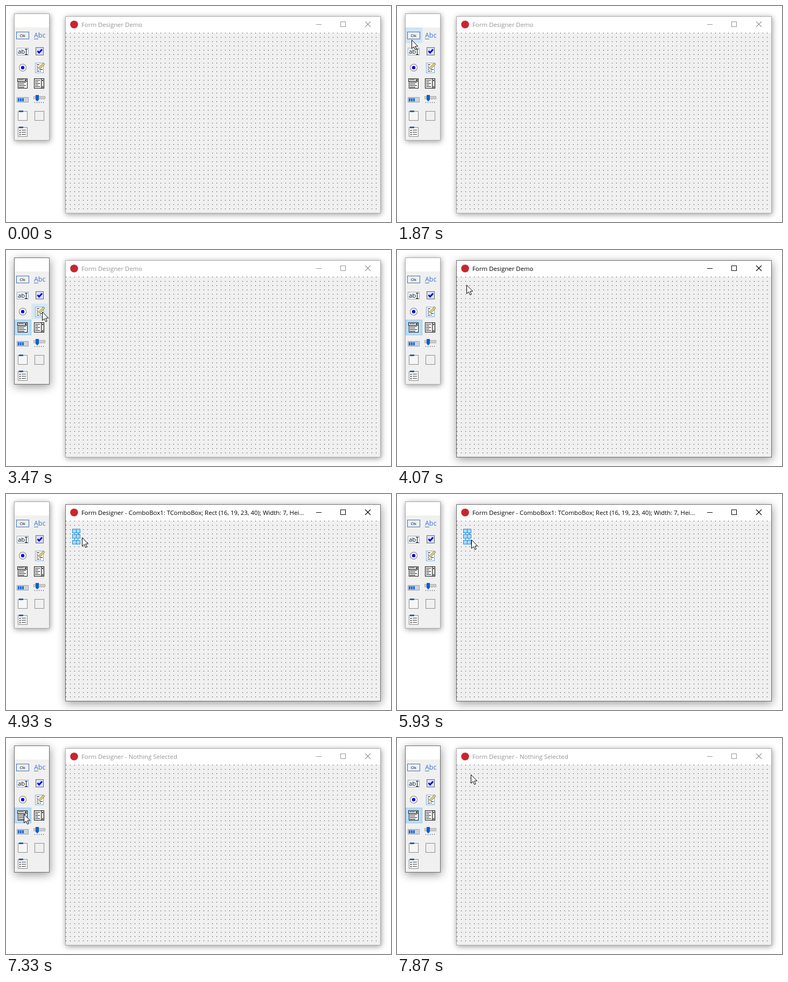
An HTML page with a canvas that plays this animation: 715 by 403 pixels, repeating every 8 s.

```html
<!DOCTYPE html>
<html lang="en">
<head>
<meta charset="utf-8">
<title>Form Designer Demo</title>
<style>
  html, body { margin: 0; width: 100%; height: 100%; overflow: hidden; background: #fff; }
  canvas { display: block; }
</style>
</head>
<body>
<canvas id="stage" width="715" height="403"></canvas>
<script>
const c = document.getElementById('stage').getContext('2d');
const TICKS = 120, RATE = 0.015; // 15 ticks per second
const BLUE = '#3b6fc4', PALE = '#f6f6f6', GREY = '#8c8c8c';

// Each glide starts where the mouse last rested
const glides = [
  { from: 1, to: 6, x: -72, y: 16 },
  { from: 7, to: 15, x: 26, y: 60 },
  { from: 27, to: 42, x: 48, y: 107 },
  { from: 42, to: 48, x: 36, y: 140 },
  { from: 49, to: 58, x: 129, y: 65 },
  { from: 61, to: 74, x: 141, y: 81 },
  { from: 76, to: 82, x: 138, y: 85 },
  { from: 92, to: 99, x: 24, y: 83 },
  { from: 99, to: 108, x: 33, y: 142 },
  { from: 111, to: 118, x: 137, y: 68 }
];

function mouseAt(tick) {
  let x = 842, y = 467;
  for (const g of glides) {
    const f = Math.min(1, Math.max(0, (tick - g.from) / (g.to - g.from)));
    x += (g.x - x) * f;
    y += (g.y - y) * f;
  }
  return [Math.round(x), Math.round(y)];
}

function fill(color, x, y, w, h) {
  c.fillStyle = color;
  c.fillRect(x, y, w, h);
}

function box(x, y, w, h, color, border) {
  fill(border, x, y, w, h);
  fill(color, x + 1, y + 1, w - 2, h - 2);
}

function text(s, x, y, size, color) {
  c.font = `${size}px "Open Sans", "Noto Sans", sans-serif`;
  c.fillStyle = color;
  c.fillText(s, x, y);
}

function trace(points) {
  c.beginPath();
  points.forEach(([x, y]) => c.lineTo(x, y));
}

function line(points, color, width = 1) {
  trace(points);
  c.strokeStyle = color;
  c.lineWidth = width;
  c.stroke();
}

function shape(points, color) {
  trace(points);
  c.fillStyle = color;
  c.fill();
}

function disc(x, y, r, color) {
  c.beginPath();
  c.arc(x, y, r, 0, 7);
  c.fillStyle = color;
  c.fill();
}

// Ragged rows that stand for lines of writing
function writing(x, y, rows, width) {
  for (let i = 0; i < rows; i++) fill('#111', x, y + i * 3, width - i % 2 * 3, 1);
}

function windowFrame(x, y, w, h, titleHeight, active) {
  c.save();
  c.shadowColor = 'rgba(0,0,0,.4)';
  c.shadowBlur = active ? 16 : 10;
  c.shadowOffsetX = 1;
  c.shadowOffsetY = active ? 4 : 2;
  fill('#fff', x, y, w, h);
  c.restore();
  box(x, y, w, h, '#f0f0f0', active ? '#6b6b6b' : '#aaa');
  fill('#fff', x + 1, y + 1, w - 2, titleHeight);
}

const icons = {
  button() {
    box(19, 48, 24, 14, '#f0f0f0', BLUE);
    text('Ok', 25.5, 58, 8, '#111');
  },
  label() {
    text('Abc', 52, 59, 12.4, BLUE);
    fill(BLUE, 52, 61, 8, 1);
  },
  edit() {
    box(20, 78, 22, 14, '#fff', '#8eaed0');
    text('ab', 22, 89, 11.3, '#000');
    fill('#000', 37, 81, 1, 9);
    fill('#000', 35, 80, 5, 1);
    fill('#000', 35, 90, 5, 1);
  },
  checkBox() {
    box(55, 77, 15, 15, '#dde1f5', '#666');
    line([[58.5, 84], [61.5, 87], [67, 81]], '#00f', 3);
  },
  radio() {
    disc(31, 115, 7, '#777');
    disc(31, 115, 6, '#fff');
    disc(31, 115, 3.2, '#00f');
  },
  memo() {
    box(54, 106, 16, 19, '#fff', '#7ba3cf');
    writing(57, 109, 5, 5);
    writing(63, 112, 4, 5);
    line([[61, 117], [71, 107]], '#8a7d4a', 4);
    line([[61.5, 116.5], [70.5, 107.5]], '#f0df82', 2.3);
  },
  comboBox() {
    box(21, 135, 19, 6, '#fff', '#111');
    fill('#111', 23, 137, 10, 1);
    shape([[34, 137], [39, 137], [36.5, 140]], '#111');
    box(22, 140, 18, 14, '#fff', '#111');
    writing(24, 142, 4, 13);
  },
  listBox() {
    box(52, 135, 19, 19, '#fff', '#111');
    writing(54, 138, 5, 9);
    box(65, 135, 6, 19, '#ddd', '#111');
    for (const y of [138, 150]) fill('#111', 67, y, 2, 2);
  },
  progress() {
    box(20, 170, 22, 10, '#c9d3df', '#94a3b5');
    for (let x = 22; x < 34; x += 4) fill('#2467c9', x, 172, 3, 6);
  },
  trackBar() {
    box(51, 168, 22, 6, '#ccc', '#b0b0b0');
    shape([[55, 166], [61, 166], [61, 175], [58, 178], [55, 175]], '#0a5fd0');
    for (let x = 53; x < 73; x += 4) fill('#666', x, 179, 1, 2);
  },
  groups() {
    box(53, 196, 18, 18, '#f0f0f0', GREY);
    for (const y of [196, 226]) {
      box(22, y, 18, 18, PALE, GREY);
      fill('#2f5f9e', 24, y - 1, 8, 3);
    }
    for (let y = 231; y < 242; y += 4) {
      fill('#444', 25, y, 2, 2);
      fill('#444', 29, y, 8, 1);
    }
  }
};

function hitCell([x, y]) {
  const col = Math.floor((x - 16) / 31), row = Math.floor((y - 40) / 30);
  const inside = col >= 0 && col < 2 && row >= 0 && row < 7 && col + row < 7;
  return inside ? [col, row] : null;
}

function cell(col, row, color, border) {
  box(16 + col * 31, 40 + row * 30, 31, 29, color, border);
}

function palette(tick, active, comboDown) {
  windowFrame(15, 14, 66, 237, 25, active);
  // Hover fades over four ticks
  c.globalAlpha = .25;
  for (let back = 0; back < 4; back++) {
    const hit = hitCell(mouseAt(tick - back));
    if (hit) cell(...hit, '#d5e6f5', '#bcd9f2');
  }
  c.globalAlpha = 1;
  if (comboDown) cell(0, 3, '#b9dcf5', '#93c9f2');
  Object.values(icons).forEach(draw => draw());
}

function form(title, active) {
  const ink = active ? '#000' : '#949494';
  windowFrame(110, 19, 586, 368, 30, active);
  disc(126.5, 34.5, 7.3, '#c9252f');
  text(title, 140, 39, 11.38, ink);
  fill(ink, 576, 34, 10, 1);
  box(621, 29, 10, 10, '#fff', ink);
  for (const d of [-5, 5]) line([[672 - d, 29], [672 + d, 39]], ink, 1.1);
  for (let y = 50; y < 386; y += 8)
    for (let x = 111; x < 695; x += 8) fill('#000', x, y, 1, 1);
}

function selectedCombo() {
  box(127, 69, 7, 21, '#fff', '#0078d7');
  for (const y of [65, 75, 86])
    for (const x of [123, 130]) box(x, y, 8, 8, '#a9dafc', '#1f86d2');
}

function pointer(x, y) {
  c.save();
  c.translate(x + .5, y + .5);
  trace([[0, 0], [0, 16], [3.7, 12.6], [6.2, 18.3], [8.7, 17.2], [6.2, 11.7], [11.2, 11.5]]);
  c.closePath();
  c.fillStyle = '#fff';
  c.fill();
  c.strokeStyle = '#000';
  c.lineWidth = 1;
  c.stroke();
  c.restore();
}

function draw(now) {
  const tick = Math.floor((now + 5) * RATE) % TICKS;
  const within = (from, to) => tick >= from && tick < to;
  const selected = within(69, 92);
  const title = selected
    ? 'Form Designer - ComboBox1: TComboBox; Rect (16, 19, 23, 40); Width: 7, Hei...'
    : tick < 69 ? 'Form Designer Demo' : 'Form Designer - Nothing Selected';

  fill('#fff', 0, 0, 715, 403);
  palette(tick, within(49, 61) || tick >= 109, within(49, 69) || tick >= 109);
  form(title, within(61, 109));
  if (selected) selectedCombo();
  pointer(...mouseAt(tick));
  requestAnimationFrame(() => draw(performance.now() - start));
}

const start = performance.now();
draw(0);
</script>
</body>
</html>
```
